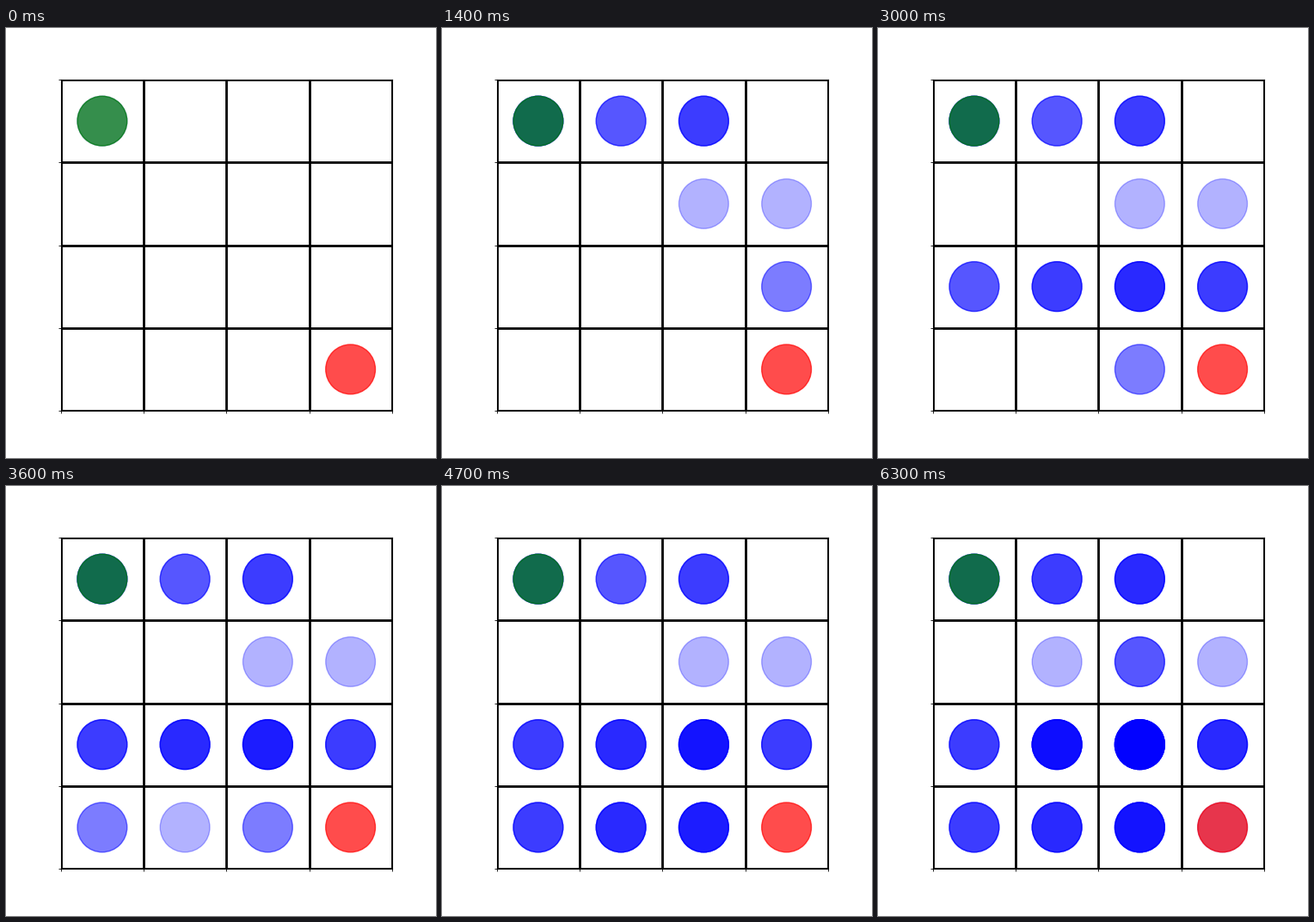
A matplotlib script that plays this animation: 500 by 500 pixels, repeating every 6400 ms.

```python
import matplotlib.pyplot as plt
from matplotlib.animation import FuncAnimation

SIZE = 4
STEP_MS = 100
# Moves into a wall leave the walker where it is.
MOVES = ("ULURURUU" "LRDRDR" "LDULLLRLRR" "RRLDULRLLDDR"
         "LLRDRDLDRDU" "LRLUURDDLRUDRLDR")
DELTAS = {"U": (0, -1), "D": (0, 1), "L": (-1, 0), "R": (1, 0)}


def clamp(value):
    return min(max(value, 0), SIZE - 1)


def walk(moves):
    x, y = 0, 0
    path = [(x, y)]
    for move in moves:
        dx, dy = DELTAS[move]
        x, y = clamp(x + dx), clamp(y + dy)
        path.append((x, y))
    return path


def add_disc(cell, color, alpha, zorder):
    disc = plt.Circle(cell, 0.3, color=color, alpha=alpha, lw=1, zorder=zorder)
    return ax.add_patch(disc)


fig, ax = plt.subplots(figsize=(5, 5), dpi=100)
ax.set_aspect("equal")
ax.set_xlim(-0.5, SIZE - 0.5)
ax.set_ylim(SIZE - 0.5, -0.5)

edges = [i - 0.5 for i in range(SIZE + 1)]
for axis in (ax.xaxis, ax.yaxis):
    axis.set_ticks([])
    axis.set_ticks(edges, minor=True)
ax.tick_params(which="minor", labelbottom=False, labelleft=False)
ax.grid(which="minor", color="black", linestyle="-", linewidth=2)

path = walk(MOVES)
visits = [add_disc(cell, "blue", 0.3, 1) for cell in path]
add_disc((0, 0), "green", 0.7, 2)
add_disc((SIZE - 1, SIZE - 1), "red", 0.7, 2)


def update(frame):
    for step, disc in enumerate(visits):
        disc.set_visible(step <= frame)
    return visits


anim = FuncAnimation(fig, update, frames=len(path), interval=STEP_MS,
                     repeat=True, repeat_delay=0, blit=False)
plt.show()
```
